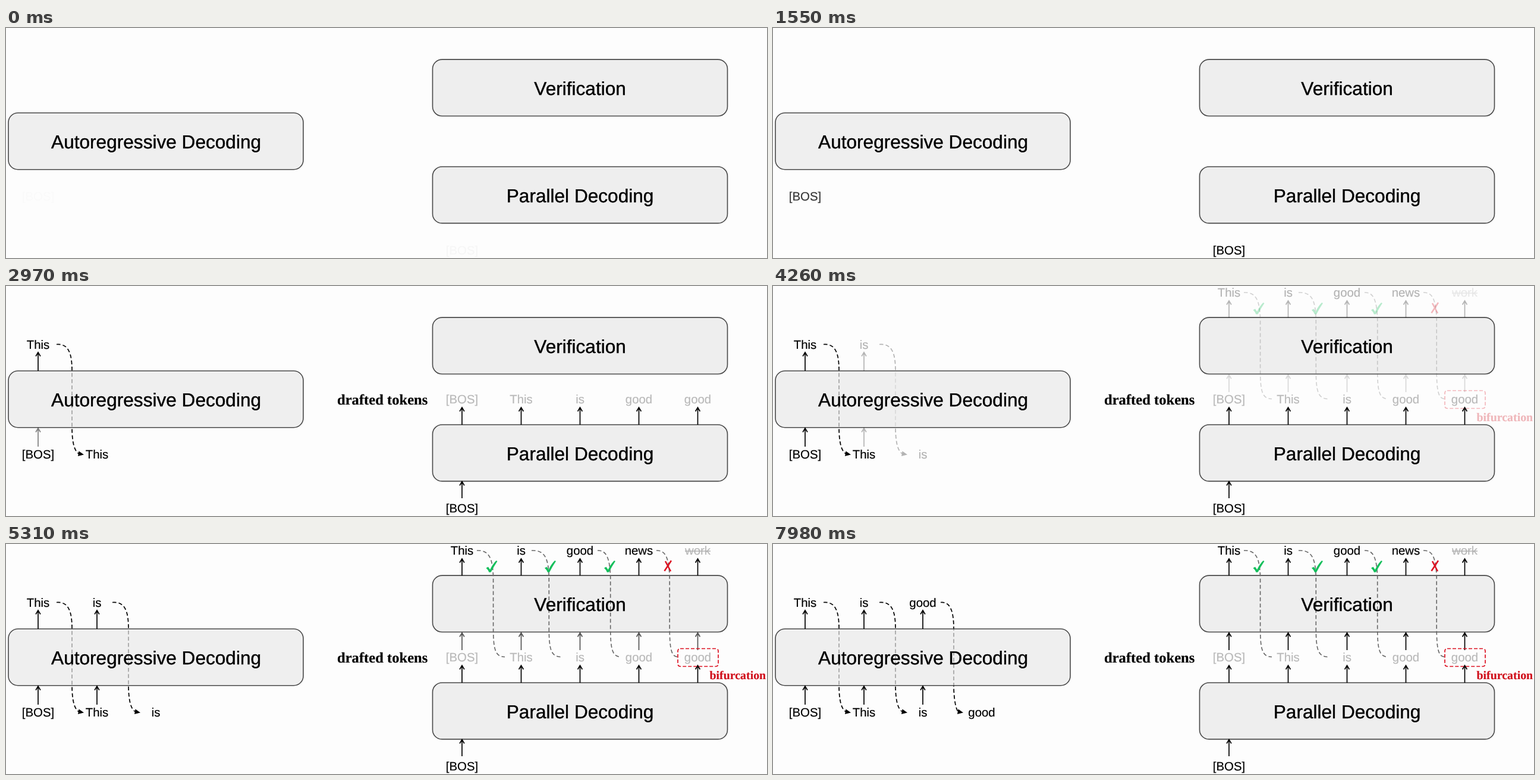
Write an HTML page that moves like this. It is 1280 by 388 pixels and loops after 8000 ms.

```html
<!DOCTYPE html>
<html lang="en">
<head>
<meta charset="utf-8">
<title>Decoding comparison</title>
<style>
  html, body { margin: 0; width: 100%; height: 100%; overflow: hidden; background: #fdfdfd; }
  svg { display: block; width: 100vw; height: 100vh; }
  text { font-family: "Liberation Sans", Arial, sans-serif; font-size: 20.4px; text-anchor: middle;
         text-rendering: geometricPrecision; stroke: #000; stroke-width: .2; }
  .title { font-size: 31.6px; stroke-width: .4; }
  .serif { font-family: "Liberation Serif", "Times New Roman", serif; font-weight: bold; text-anchor: start; }
  .box { fill: rgba(233, 233, 233, .7); stroke: #484848; stroke-width: 1.6; }
  .line { fill: none; stroke: #000; stroke-width: 1.7; }
  .dash { stroke-dasharray: 6.5 4; }
  .soft { stroke: #666; stroke-width: 1.6; }
  .pale { fill: #b9b9b9; stroke: #b9b9b9; }
  .red { fill: #d0101c; stroke: #d0101c; }

  /* Four steps, two seconds apart; each has a fast (1 s) and a slow (2 s) fade. */
  g[class] { animation: 8s linear infinite both; }
  g.fast1 { animation-name: fast1; }
  g.slow1 { animation-name: slow1; }
  g.fast2 { animation-name: fast2; }
  g.slow2 { animation-name: slow2; }
  g.fast3 { animation-name: fast3; }
  g.slow3 { animation-name: slow3; }
  g.fast4 { animation-name: fast4; }
  g.slow4 { animation-name: slow4; }
  @keyframes fast1 { 0% { opacity: .03 } 12.125%, 100% { opacity: 1 } }
  @keyframes slow1 { 0% { opacity: .015 } 24.625%, 100% { opacity: 1 } }
  @keyframes fast2 { 0%, 24.625% { opacity: 0 } 37.125%, 100% { opacity: 1 } }
  @keyframes slow2 { 0%, 24.625% { opacity: 0 } 49.625%, 100% { opacity: 1 } }
  @keyframes fast3 { 0%, 49.625% { opacity: 0 } 62.125%, 100% { opacity: 1 } }
  @keyframes slow3 { 0%, 49.625% { opacity: 0 } 74.625%, 100% { opacity: 1 } }
  @keyframes fast4 { 0%, 74.625% { opacity: 0 } 87.125%, 100% { opacity: 1 } }
  @keyframes slow4 { 0%, 74.625% { opacity: 0 } 99.625%, 100% { opacity: 1 } }
</style>
</head>
<body>
<svg id="stage" viewBox="0 0 1280 388" preserveAspectRatio="none"></svg>
<script>
const leftCols = [54, 153, 252, 351];
const rightCols = [767, 866.5, 965.5, 1064.5, 1163.5];

const group = (cls, ...parts) => `<g class="${cls}">${parts.join('')}</g>`;
const label = (x, y, str, cls = '') => `<text x="${x}" y="${y}" class="${cls}">${str}</text>`;
const box = (x, y) => `<rect class="box" x="${x}" y="${y}" width="496" height="95.4" rx="16"/>`;
const labels = (cols, y, words, cls) => words.map((w, i) => label(cols[i], y, w, cls)).join('');

// Upward arrow with an open head
const arrow = (x, from, to) =>
  `<path class="line" d="M${x} ${from}V${to + 1}M${x - 3.9} ${to + 7.5}L${x} ${to + 1}L${x + 3.9} ${to + 7.5}"/>`;
const arrows = (cols, from, to) => cols.map(x => arrow(x, from, to)).join('');

// Dashed feedback line from an output down to the next input
const feedback = (x, mid, end) =>
  `<path class="line dash" d="M${x} 98.5C${mid - 6} 97 ${mid} 113 ${mid} 143V237C${mid} 264 ${mid + 4} 278 ${end - 9} 282.5"/>` +
  `<path d="M${end} 284.5L${end - 10} 287L${end - 8.5} 278.5Z"/>`;

const compare = (x, mid, end) =>
  `<path class="line dash soft" d="M${x} 11C${mid - 7} 10 ${mid - 1} 24 ${mid} 56V140C${mid} 178 ${mid + 3} 190 ${end} 190.5"/>`;

const tick = x =>
  `<path fill="#14bf5c" transform="translate(${x} 38)" d="M-9 2.5L-5.5 .5L-2.3 5.2Q2 -4 8 -10L10 -9Q4 0 -.8 9.5L-4 9.8Q-6 5 -9 2.5Z"/>`;

const cross = '<path d="M1107.5 45.5L1119 28M1109 29L1118 46" fill="none" stroke="#dc1020" stroke-width="2.5"/>';
const strike = '<path d="M1142 12H1185" stroke="#b0b0b0" stroke-width="1.5"/>';
const frame = '<rect x="1130" y="176.5" width="68" height="30" rx="4" fill="none" stroke="#dc1020" stroke-width="1.7" stroke-dasharray="6 3"/>';

document.getElementById('stage').innerHTML = [
  // Left: one token at a time, feedback lines showing faintly through the box
  group('fast2', feedback(85, 111, 131)),
  group('fast3', feedback(179, 206, 226)),
  group('fast4', feedback(282, 304, 320)),
  box(4, 143.3),
  label(252.6, 202.9, 'Autoregressive Decoding', 'title'),
  group('slow1', label(54, 291, '[BOS]')),
  group('slow2', arrow(54, 271, 239)),
  group('fast2', label(54, 105.5, 'This'), arrow(54, 143, 111), label(153, 291, 'This')),
  group('fast3', label(153, 105.5, 'is'), arrow(153, 143, 111), arrow(153, 271, 239), label(252, 291, 'is')),
  group('slow4', arrow(252, 271, 239)),
  group('fast4', label(252, 105.5, 'good'), arrow(252, 143, 111), label(351, 291, 'good')),

  // Right: draft in parallel, then verify
  box(717.5, 53.1),
  box(717.5, 234),
  group('fast3',
    compare(792, 819.6, 839), compare(884, 913.3, 934), compare(995, 1016.7, 1034), compare(1094, 1116.2, 1130)),
  label(965.6, 112.9, 'Verification', 'title'),
  label(965.6, 293.9, 'Parallel Decoding', 'title'),
  group('fast1', label(767, 382, '[BOS]')),
  group('fast2',
    arrow(767, 358, 329),
    arrows(rightCols, 234, 204),
    labels(rightCols, 198, ['[BOS]', 'This', 'is', 'good', 'good'], 'pale'),
    '<text class="serif" x="557" y="200" style="font-size:24.6px">drafted tokens</text>'),
  group('slow3', arrows(rightCols, 179, 149)),
  group('fast3',
    arrows(rightCols, 53, 24),
    labels(rightCols, 18, ['This', 'is', 'good', 'news']),
    label(1163.5, 18, 'work', 'pale'), strike,
    [816.5, 915, 1015].map(tick).join(''), cross, frame,
    '<text class="serif red" x="1183.5" y="228" style="font-size:19.9px">bifurcation</text>')
].join('');
</script>
</body>
</html>
```
